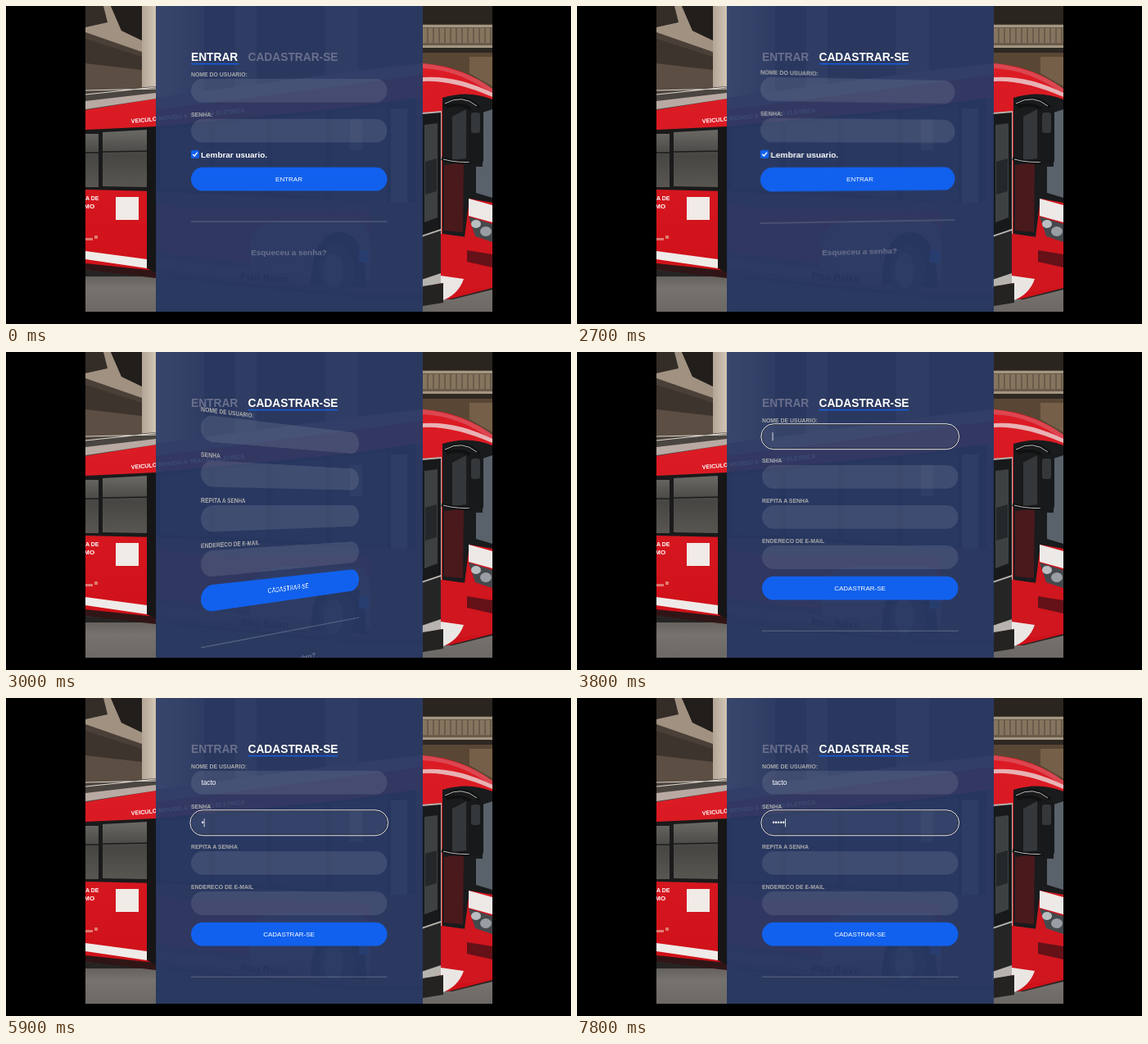
An HTML page for the animation above (8000 ms loop, 690 px wide and 388 px high).

```html
<!DOCTYPE html>
<html lang="pt">
<head>
<meta charset="utf-8">
<title>Entrar</title>
<style>
  html, body { margin: 0; width: 100%; height: 100%; overflow: hidden; background: #000; }
  svg { position: absolute; left: 0; top: 0; width: 690px; height: 388px; }
  text { font-family: "Liberation Sans", Arial, sans-serif; }
  #stage { position: absolute; left: 0; top: 0; width: 690px; height: 373px; overflow: hidden; }
  #forms { position: absolute; inset: 0; overflow: hidden; perspective: 621px; perspective-origin: 345.5px 185px; }
  .card { transform-origin: 345.5px 185px; }
  .tab { font-size: 13.75px; font-weight: 700; }
  .label { font-size: 6.9px; font-weight: 700; fill: #aaa; }
  .note { font-size: 9.93px; font-weight: 700; fill: #6a6f8c; text-anchor: middle; }
  .action { font-size: 8px; fill: #fff; text-anchor: middle; }
  .value { font-size: 8.28px; fill: #fff; }
  .pill { fill: #fff; fill-opacity: .1; }
  .pill.on { fill-opacity: .06; }
</style>
</head>
<body>
<div id="stage">
  <svg viewBox="0 0 690 388">
    <defs>
      <clipPath id="photo"><path d="M97 0H594V373H97Z"/></clipPath>
      <linearGradient id="stone"><stop offset="0" stop-color="#b3a595"/><stop offset=".2" stop-color="#cfc2b3"/><stop offset=".6" stop-color="#a89a8a"/><stop offset="1" stop-color="#6a5e52"/></linearGradient>
      <linearGradient id="glass" x2="0" y2="1"><stop offset="0" stop-color="#6b6964"/><stop offset=".45" stop-color="#474643"/><stop offset="1" stop-color="#595651"/></linearGradient>
      <linearGradient id="road" x2="0" y2="1"><stop offset="0" stop-color="#55524f"/><stop offset=".5" stop-color="#76726e"/><stop offset="1" stop-color="#6c6865"/></linearGradient>
      <linearGradient id="red" x2="0" y2="1"><stop offset="0" stop-color="#dc1c25"/><stop offset="1" stop-color="#cf1119"/></linearGradient>
    </defs>
    <g clip-path="url(#photo)">
      <!-- building -->
      <path d="M97 0H594V373H97Z" fill="#4a4038"/>
      <path d="M97 0H119L126 20L97 26Z" fill="#332c27"/>
      <path d="M119 0H128L141 30L166 42V56L97 32V26L124 20Z" fill="#a09181"/>
      <path d="M128 0H166V42L141 30Z" fill="#221e1b"/>
      <path d="M97 40L166 62V102H97Z" fill="#3d342d"/>
      <path d="M97 70L166 78V102H97Z" fill="#5c4e43"/>
      <path d="M166 0H242V130H166Z" fill="url(#stone)"/>
      <path d="M242 0H420V110H242Z" fill="#3f3731"/>
      <path d="M280 0H306V110H280ZM390 0H430V100H390Z" fill="#75685b"/>
      <path d="M509 0H594V22H509Z" fill="#2b2520"/>
      <path d="M509 24H594V50H509Z" fill="#6a5b4b"/>
      <path d="M509 36H594" stroke="#85755f" stroke-width="18" stroke-dasharray="5 2"/>
      <path d="M509 23H594V26H509ZM509 48H594V51H509Z" fill="#a39681"/>
      <path d="M509 51H594V57H509Z" fill="#2e2822"/>
      <path d="M509 57H594V110H509Z" fill="#5a4634"/>
      <path d="M566 62H594V98L566 82Z" fill="#755f48"/>
      <!-- road -->
      <path d="M97 316H594V373H97Z" fill="url(#road)"/>
      <path d="M183 322H509V373H183Z" fill="#3c3938"/>
      <path d="M97 322L183 330L430 356L545 358L594 346V330H97Z" fill="#252423"/>
      <!-- bus -->
      <path d="M97 126L183 112L420 80L509 70V352L430 352L183 328L97 318Z" fill="#4a3c40"/>
      <path d="M97 126L183 112V328L97 318Z" fill="url(#red)"/>
      <path d="M509 70Q560 74 594 102V344L540 358L509 354Z" fill="url(#red)"/>
      <path d="M183 112L420 80L509 70V84L420 96L183 127Z" fill="#8d7478"/>
      <path d="M183 127L420 96L509 84V112L420 124L183 147Z" fill="#8d2f3c"/>
      <path d="M97 105L183 98V113L97 127Z" fill="#4b4541"/>
      <path d="M97 116L183 106V113L97 126Z" fill="#b8aaa3"/>
      <path d="M97 103L183 101M97 108L183 99" stroke="#ddd6cd" stroke-width="1.2"/>
      <path d="M509 76Q555 78 594 108V101Q560 76 509 70Z" fill="#dc4650"/>
      <path d="M509 92Q545 90 594 111V106Q550 84 509 87Z" fill="#ece5e4" opacity=".75"/>
      <path d="M97 151L183 147L420 124L500 112V240L420 238L183 226L97 224Z" fill="#1a1a1b"/>
      <path d="M97 156H113V221H97ZM118 154L173 151V221L118 220Z" fill="url(#glass)"/>
      <path d="M97 179H113M118 178L173 177" stroke="#1c1c1c" stroke-width="1.5"/>
      <path d="M188 150L248 145V224L188 222ZM255 144L318 138V228L255 225ZM326 137L390 130V234L326 229ZM398 129L465 121V240L398 235Z" fill="#38383a"/>
      <path d="M420 138H435V176H420ZM470 125H490V240H470Z" fill="#84847c" opacity=".7"/>
      <path d="M183 240L215 246L445 250V274L298 276V314L183 300Z" fill="#7d2936"/>
      <path d="M298 290Q302 264 340 262H430Q445 264 445 300V336L298 326Z" fill="#69616a"/>
      <path d="M97 299L172 309V320L97 309Z" fill="#efebe8"/>
      <path d="M183 309L430 334V346L183 320Z" fill="#5c5657"/>
      <path d="M97 314L183 323V332L97 322Z" fill="#301516"/>
      <path d="M172 148H184V326L172 320Z" fill="#161617"/>
      <path d="M372 340Q374 276 408 276Q440 278 440 344Z" fill="#1a1a1c"/>
      <ellipse cx="404" cy="323" rx="22" ry="32" fill="#333335"/>
      <ellipse cx="400" cy="323" rx="12" ry="21" fill="#5e5c5c"/>
      <path d="M431 298H443V313H431Z" fill="#1d62be"/>
      <path d="M97 283H106V286H97ZM108 280H112V284H108Z" fill="#df7a70"/>
      <path d="M134 233H162V261H134Z" fill="#f0ebe7"/>
      <g fill="#fff" font-weight="700">
        <text x="153" y="143" font-size="7.15" transform="rotate(-5.5 153 143)">VEICULO MOVIDO A TRAÇÃO ELETRICA</text>
        <text x="97" y="237" font-size="7">A DE</text>
        <text x="93" y="247" font-size="8">IMO</text>
        <text x="286" y="333" font-size="11.5" fill="#000" transform="rotate(4 286 333)">Piso Baixo</text>
      </g>
      <!-- bus front -->
      <path d="M507 130L532 128V338L507 344Z" fill="#b7b3ae"/>
      <path d="M507 132L531 130V272L507 280Z" fill="#17191b"/>
      <path d="M511 145L527 143V258L511 264Z" fill="#3d4142"/>
      <path d="M512 190L526 186V226L512 230Z" fill="#24282a"/>
      <path d="M507 282L531 274V326L507 334Z" fill="#252526"/>
      <path d="M533 112Q565 102 594 114V240L566 235L560 282L533 278Z" fill="#191b1d"/>
      <path d="M545 135L562 126V186L545 188Z" fill="#35383a"/>
      <path d="M582 130L594 126V234L574 228V196H582Z" fill="#59616a"/>
      <path d="M531 278L562 282L566 236L594 243V343L531 352Z" fill="#d0161f"/>
      <path d="M535 194L559 191L558 276L535 274Z" fill="#4a191c"/>
      <path d="M565 235L594 243V264L565 256Z" fill="#ede9e7"/>
      <path d="M565 257L594 266V288L573 281Z" fill="#45494c"/>
      <ellipse cx="574" cy="266" rx="6" ry="5" fill="#b9bec1"/>
      <ellipse cx="586" cy="275" rx="7" ry="6" fill="#989ea3"/>
      <path d="M563 298L594 303V319L563 312Z" fill="#641118"/>
      <path d="M531 329L559 333Q552 353 531 360Z" fill="#eae6e3"/>
      <path d="M509 342L534 338V362L509 366Z" fill="#242322"/>
      <path d="M535 121Q557 104 578 124M538 123Q559 116 573 130M532 186Q552 193 579 190" fill="none" stroke="#111" stroke-width="4"/>
      <path d="M536 119Q557 107 575 122M534 187Q552 192 576 190" fill="none" stroke="#bbb" stroke-width="1"/>
      <rect x="565" y="124" width="18" height="69" rx="5" fill="#17191b"/>
      <rect x="568" y="130" width="11" height="25" rx="3" fill="#34383a"/>
    </g>
    <path d="M183 0H509V373H183Z" fill="#283965" fill-opacity=".9"/>
    <text class="tab" id="tabIn" x="226" y="66.5">ENTRAR</text>
    <text class="tab" id="tabUp" x="295.5" y="66.5">CADASTRAR-SE</text>
    <rect id="line" y="70" height="1.3" fill="#1161ee"/>
  </svg>
  <div id="forms">
    <svg class="card" id="signIn" viewBox="0 0 690 388"></svg>
    <svg class="card" id="signUp" viewBox="0 0 690 388"></svg>
  </div>
</div>
<script>
const LOOP = 8000, STEP = 100;
const FLIP_START = 2683, FLIP_TIME = 400;
const LEFT = 226, WIDTH = 239.5, PILL_H = 28.8, MID = 345.5, TEXT_X = 238.4;

// time, focused field, typed text
const USER = 'tacto';
const KEYS = [
  [3800, 0, ''], [4700, 0, 't'], [4900, 0, 'ta'], [5000, 0, 'tac'], [5200, 0, 'tact'], [5400, 0, USER],
  [5700, 1, ''], [5900, 1, '•'], [6000, 1, '••'], [6200, 1, '•••'], [6400, 1, '••••'], [6700, 1, '•••••']
];

const $ = id => document.getElementById(id);

function add(parent, tag, attrs, text) {
  const el = document.createElementNS('http://www.w3.org/2000/svg', tag);
  for (const key in attrs) el.setAttribute(key, attrs[key]);
  if (text) el.textContent = text;
  parent.append(el);
  return el;
}

const pill = (card, y, attrs) =>
  add(card, 'rect', { x: LEFT, y, width: WIDTH, height: PILL_H, rx: PILL_H / 2, ...attrs });

function field(card, label, y) {
  add(card, 'text', { class: 'label', x: LEFT, y: y - 3.2 }, label);
  const box = pill(card, y, { class: 'pill' });
  const ring = add(card, 'g', { fill: 'none' });
  [[.4, '#101010'], [1.1, '#fff']].forEach(([gap, stroke]) => add(ring, 'rect', {
    x: LEFT - gap, y: y - gap, width: WIDTH + 2 * gap, height: PILL_H + 2 * gap,
    rx: PILL_H / 2 + gap, stroke, 'stroke-width': .9
  }));
  const value = add(card, 'text', { class: 'value', x: TEXT_X, y: y + 17.3 });
  return { box, ring, value };
}

function button(card, label, y) {
  pill(card, y, { fill: '#1161ee' });
  add(card, 'text', { class: 'action', x: MID, y: y + 17.2 }, label);
}

function footer(card, label, y) {
  add(card, 'rect', { x: LEFT, y: y - .6, width: WIDTH, height: 1.2, fill: '#fff', 'fill-opacity': .2 });
  add(card, 'text', { class: 'note', x: MID, y: y + 40.5 }, label);
}

const signIn = $('signIn'), signUp = $('signUp');

const inFields = [['NOME DO USUARIO:', 88.8], ['SENHA:', 137.8]].map(([s, y]) => field(signIn, s, y));
add(signIn, 'rect', { x: 226, y: 176, width: 9.8, height: 9.8, rx: 1.6, fill: '#1161ee' });
add(signIn, 'path', { d: 'M228.2 181L230.2 183L233.8 178.6', fill: 'none', stroke: '#fff', 'stroke-width': 1.4 });
add(signIn, 'text', { x: 238, y: 185, fill: '#fff', 'font-size': 9.93, 'font-weight': 700 }, 'Lembrar usuario.');
button(signIn, 'ENTRAR', 196.8);
footer(signIn, 'Esqueceu a senha?', 263);

const upFields = ['NOME DE USUARIO:', 'SENHA', 'REPITA A SENHA', 'ENDERECO DE E-MAIL']
  .map((s, i) => field(signUp, s, 88.8 + i * 49.1));
upFields[1].value.style.fontSize = '8.8px';
button(signUp, 'CADASTRAR-SE', 273.8);
footer(signUp, 'Já é um membro?', 340.3);
const caret = add(signUp, 'rect', { width: .8, height: 10, fill: '#fff' });

const show = (el, on) => { el.style.visibility = on ? 'visible' : 'hidden'; };
inFields.forEach(f => show(f.ring, false));

function turn(card, angle) {
  show(card, Math.abs(angle) < 90);
  card.style.transform = angle ? `rotateY(${angle}deg)` : 'none';
}

function drawTabs(joined) {
  $('tabIn').setAttribute('fill', joined ? '#6a6f8c' : '#fff');
  $('tabUp').setAttribute('fill', joined ? '#fff' : '#6a6f8c');
  $('line').setAttribute('x', joined ? 295.5 : 226);
  $('line').setAttribute('width', joined ? 109.7 : 58);
}

function drawInput(t) {
  const past = KEYS.filter(k => k[0] <= t);
  const last = past[past.length - 1];
  const focus = last ? last[1] : -1;
  upFields.forEach((f, i) => {
    const own = past.filter(k => k[1] === i).pop();
    f.value.textContent = own ? own[2] : '';
    f.ring.style.display = i === focus ? '' : 'none';
    f.box.classList.toggle('on', i === focus);
  });
  const age = last ? t - last[0] : 0;
  caret.style.display = last && (age < 500 || age >= 1100) ? '' : 'none';
  if (!last) return;
  const width = last[2] ? upFields[focus].value.getComputedTextLength() : 0;
  caret.setAttribute('x', TEXT_X + width + .2);
  caret.setAttribute('y', 98.2 + focus * 49.1);
}

let shown = -1;
function draw(now) {
  const t = Math.floor(now % LOOP / STEP) * STEP;
  if (t !== shown) {
    shown = t;
    const p = Math.min(1, Math.max(0, (t - FLIP_START) / FLIP_TIME));
    drawTabs(p > 0);
    turn(signIn, 180 * p);
    turn(signUp, 180 * (1 - p));
    drawInput(t);
  }
}

const start = performance.now();
function tick() {
  draw(performance.now() - start);
  requestAnimationFrame(tick);
}
tick();
</script>
</body>
</html>
```
